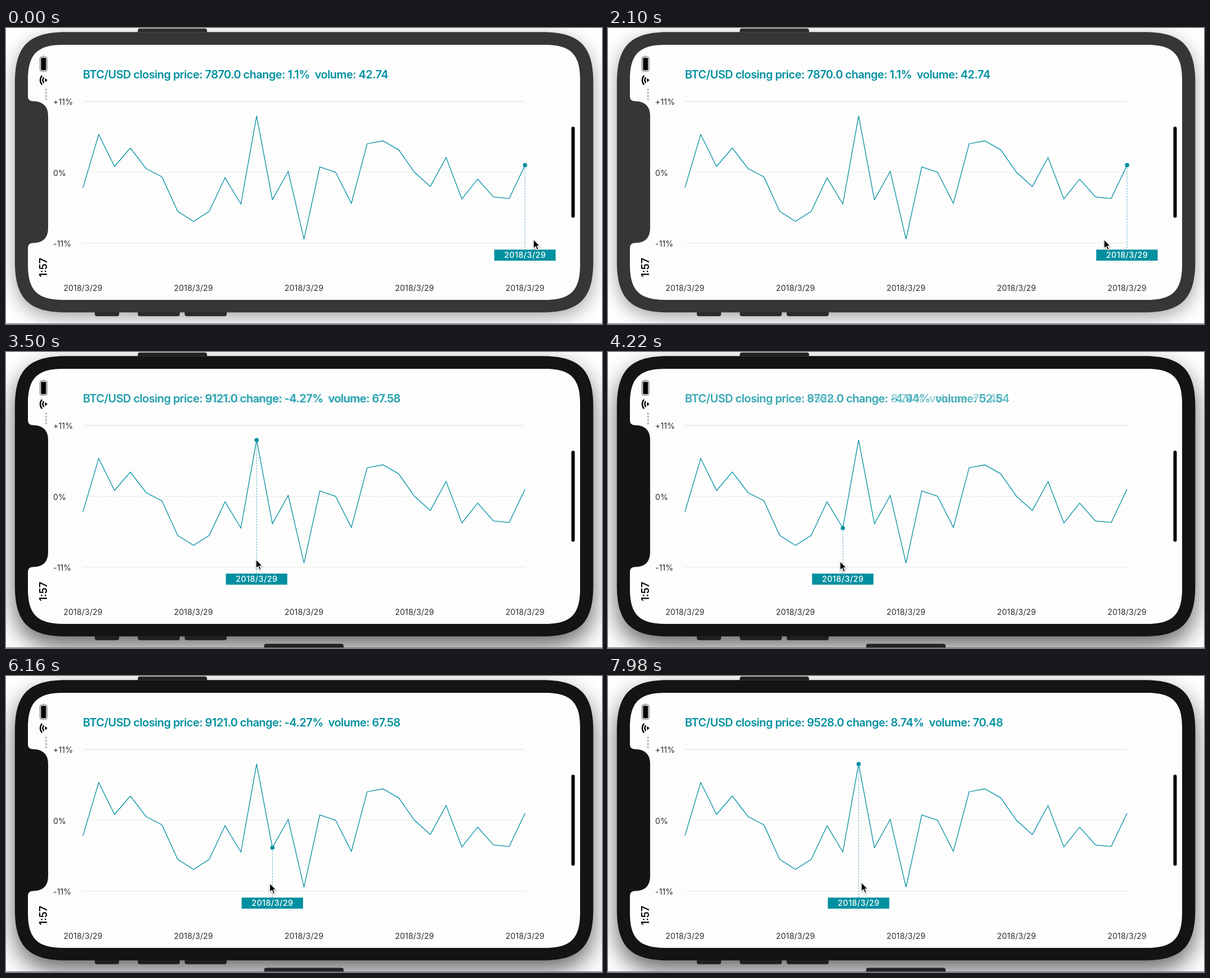
These frames come from a looping animation (1061x528 px, 8000 ms). An HTML page:

```html
<!DOCTYPE html>
<html lang="en">
<head>
<meta charset="utf-8">
<title>Price chart</title>
<style>
html, body { margin: 0; width: 100%; height: 100%; overflow: hidden; background: #fff; }
svg { display: block; width: 1061px; height: 528px; font-family: Inter, Roboto, sans-serif; --body: #363636; --button: #2b2b2b; }
svg.active { --body: #141414; --button: #1f1f1f; }
#body { fill: var(--body); filter: drop-shadow(0 9px 16px rgba(0, 0, 0, .36)); }
.active #body { filter: drop-shadow(0 18px 21px rgba(0, 0, 0, .6)); }
#buttons { fill: var(--button); stroke: #111; stroke-width: .6; }
#tab { visibility: hidden; fill: #222; }
.active #tab { visibility: visible; }
#axis { font-size: 14.2px; letter-spacing: .1px; fill: #2e2e2e; }
.date { text-anchor: middle; }
.title { font-size: 20px; font-weight: 600; letter-spacing: -.55px; fill: #0090a0; }
#tag { font-size: 14.2px; font-weight: 500; letter-spacing: .5px; fill: #fff; }
</style>
</head>
<body>
<svg id="stage" viewBox="0 0 1061 528">
  <clipPath id="outside"><path d="M0 0H1061V7.5H0ZM0 507H1061V528H0Z"/></clipPath>
  <path id="body"/>
  <g id="buttons" clip-path="url(#outside)">
    <rect x="235" y="1.3" width="122.5" height="12" rx="3"/>
    <rect x="158.5" y="500" width="42.5" height="13.7" rx="3"/>
    <rect x="235" y="500" width="74" height="13.7" rx="3"/>
    <rect x="318.5" y="500" width="74" height="13.7" rx="3"/>
  </g>
  <rect id="tab" x="459.5" y="520.5" width="141.5" height="12" rx="4"/>
  <path d="M0 527.5H1061" stroke="#6b6880"/>
  <path id="screen" fill="#fdfdfd"/>

  <rect x="60.5" y="51.5" width="12.5" height="25.5" rx="2.5" fill="none" stroke="#555"/>
  <rect x="62.3" y="53.3" width="9" height="22" rx="1.2"/>
  <path d="M64.5 49.5Q66.7 47.8 69 49.5Z" fill="#555"/>
  <g fill="none" stroke="#000" stroke-width="2.5">
    <path d="M64.2 84.9A12 12 0 0 0 64.2 101.1"/>
    <path d="M67.4 88A7.6 7.6 0 0 0 67.4 98"/>
    <path d="M73.5 93L70.4 89.8A4.4 4.4 0 0 0 70.4 96.2Z" fill="#000" stroke="none"/>
  </g>
  <path d="M71.3 110V128" stroke="#bdbdbd" stroke-width="4" stroke-linecap="round" stroke-dasharray="0 5.7"/>
  <text transform="translate(73 444.5) rotate(-90)" font-size="18" font-weight="600">1:57</text>
  <rect x="1006.5" y="176" width="6" height="162.5" rx="3"/>

  <path d="M137 131H924" stroke="#d6d9ec" stroke-width="1.2"/>
  <path d="M137 257.5H924" stroke="#cfe0dc" stroke-dasharray="3 2.4"/>
  <path d="M137 383.5H924" stroke="#e7e9d8" stroke-width="1.2"/>
  <g id="axis">
    <text x="84" y="137.3">+11%</text>
    <text x="84" y="263.8">0%</text>
    <text x="84" y="390">-11%</text>
  </g>
  <polyline id="line" fill="none" stroke="#0090a0" stroke-width="1.3"/>
  <text id="before" class="title" x="137" y="90"></text>
  <text id="now" class="title" x="137" y="90"></text>
  <path id="drop" stroke="#5fa9c4" stroke-dasharray="3 2"/>
  <circle id="dot" r="3.8" fill="#0090a0"/>
  <g id="tag">
    <rect x="-54.8" y="395.3" width="109.3" height="19.7" fill="#0090a0"/>
    <text class="date" y="409.8">2018/3/29</text>
  </g>
  <path id="pointer" d="M0 0V16.5L3.8 13L6.4 19L9.2 17.8L6.7 12H11.8Z" stroke="#fff" stroke-width="1.3" style="filter: drop-shadow(0 1px 1px rgba(0,0,0,.35))"/>
</svg>
<script>
const $ = id => document.getElementById(id);
const LOOP = 8000, PRESS = 2500, LAG = 100, FADE = 250;
const LEFT = 137, STEP = 787 / 28, LAST = 28;

// Rectangle with continuous corners; `left` is an optional detour on the way up the left side.
function softRect(x, y, r, b, radius, left = '') {
  const a = radius * 1.3, c = radius * .35;
  return `M${x} ${y + a}C${x} ${y + c} ${x + c} ${y} ${x + a} ${y}` +
    `H${r - a}C${r - c} ${y} ${r} ${y + c} ${r} ${y + a}` +
    `V${b - a}C${r} ${b - c} ${r - c} ${b} ${r - a} ${b}` +
    `H${x + a}C${x + c} ${b} ${x} ${b - c} ${x} ${b - a}${left}Z`;
}
const notch = 'V392Q39 383.5 48 383.5Q75 383 75 357V157Q75 131 48 130.5Q39 130.5 39 122';
$('body').setAttribute('d', softRect(15.8, 7.3, 1045.5, 507.2, 70));
$('screen').setAttribute('d', softRect(39, 30, 1022, 485, 48, notch));

// Linear interpolation through [position, value] stops, held at both ends.
function track(stops, p) {
  const n = stops.findIndex(s => s[0] > p);
  if (n < 1) return stops[n ? stops.length - 1 : 0][1];
  const [[p0, v0], [p1, v1]] = stops.slice(n - 1, n + 1);
  return v0 + (v1 - v0) * (p - p0) / (p1 - p0);
}

// Daily change in percent: it drives the curve and, compounded, the price.
const changes = [-2.4, 5.87, .9, 3.77, .55, -.71, -6.07, -7.64, -6.07, -.85,
  -4.94, 8.74, -4.27, .13, -10.4, .83, 0, -4.84, 4.43, 4.88,
  3.48, -.02, -2.21, 2.29, -4.15, -1.06, -3.85, -4.08, 1.1];
const volumes = [[10, 52.54], [11, 70.48], [12, 67.58], [20, 54.28], [28, 42.74]];
let price = 10562;
const titles = changes.map((change, day) => {
  price = Math.round(price * (1 + change / 100));
  return `BTC/USD closing price: ${price}.0 change: ${change}%\u00a0 volume: ${track(volumes, day).toFixed(2)}`;
});

const xAt = day => LEFT + day * STEP;
const yAt = day => 257.3 - changes[day] * 11.48;
$('line').setAttribute('points', changes.map((c, day) => `${xAt(day)},${yAt(day)}`).join(' '));
for (let day = 0; day <= LAST; day += 7)
  $('axis').insertAdjacentHTML('beforeend', `<text class="date" x="${xAt(day)}" y="469.3">2018/3/29</text>`);

const pointerX = [[300, 939], [1900, 883], [PRESS, 883], [2920, 600], [3400, 447], [3900, 437],
  [4220, 413], [5000, 415], [5440, 456], [6400, 474], [7260, 460], [7980, 451]];
const pointerY = [[PRESS, 377], [2920, 367], [4220, 373], [5440, 370], [7980, 368]];

// The marker trails the pressed pointer and snaps to the nearest day.
const dayAt = t => t - LAG < PRESS ? LAST : Math.round((track(pointerX, t - LAG) - LEFT) / STEP);
const jumps = [{ time: -FADE, from: LAST, day: LAST }];
for (let t = 0; t < LOOP; t += 5) {
  const from = jumps[jumps.length - 1].day, day = dayAt(t);
  if (day !== from) jumps.push({ time: t, from, day });
}

function draw(t) {
  const { time, from, day } = jumps.filter(j => j.time <= t).pop();
  const fade = Math.min(1, (t - time) / FADE);
  const x = xAt(day), y = yAt(day);
  $('stage').classList.toggle('active', t >= PRESS);
  $('before').textContent = titles[from];
  $('before').style.opacity = 1 - fade;
  $('now').textContent = titles[day];
  $('now').style.opacity = fade;
  $('drop').setAttribute('d', `M${x} ${y}V395`);
  $('dot').setAttribute('cx', x);
  $('dot').setAttribute('cy', y);
  $('tag').setAttribute('transform', `translate(${x})`);
  $('pointer').setAttribute('transform', `translate(${track(pointerX, t)} ${track(pointerY, t)})`);
}

const start = performance.now();
function tick() {
  draw((performance.now() - start) % LOOP);
  requestAnimationFrame(tick);
}
tick();
</script>
</body>
</html>
```
